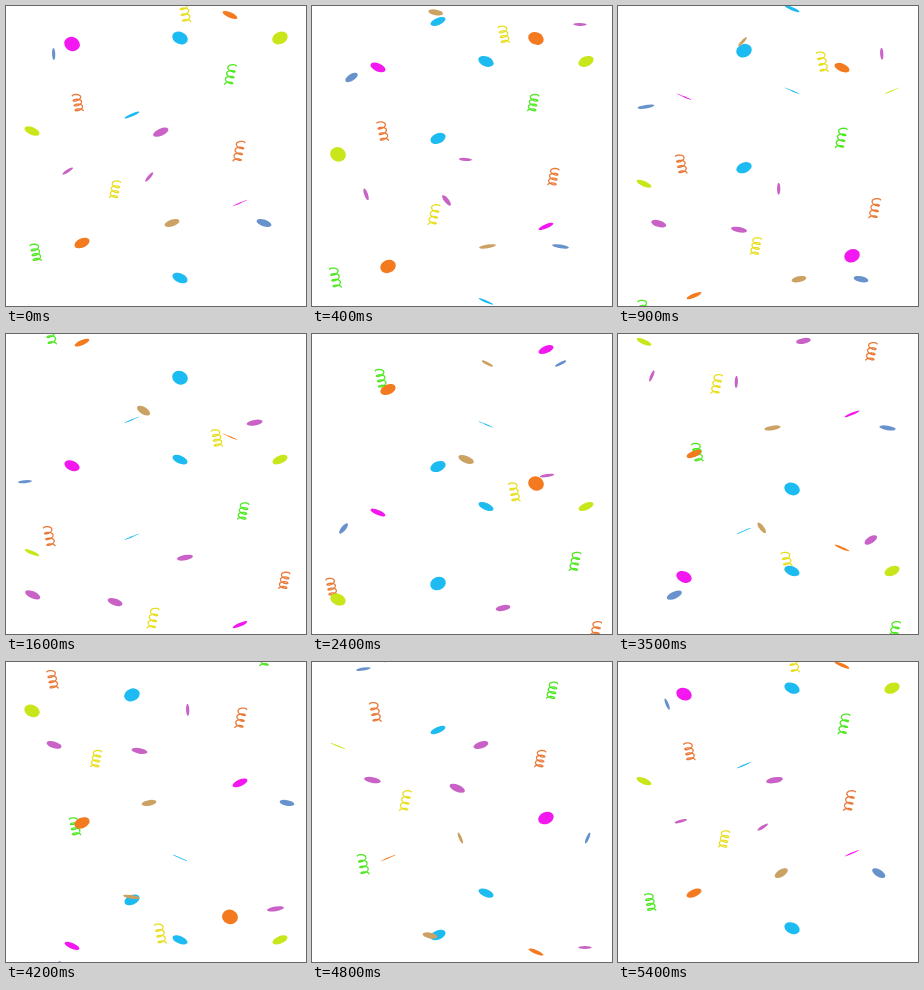
An HTML page with a canvas for the animation above (5500 ms loop, 300 by 300 pixels).

```html
<!DOCTYPE html>
<html lang="en">
<head>
<meta charset="utf-8">
<title>Confetti</title>
<style>
  html, body { margin: 0; width: 100%; height: 100%; overflow: hidden; background: #fff; }
  canvas { display: block; width: 300px; height: 300px; }
</style>
</head>
<body>
<canvas id="stage" width="300" height="300"></canvas>
<script>
const ctx = document.getElementById('stage').getContext('2d');
const STEPS = 55, STEP_MS = 100, FALL = 322, SPEED = FALL / STEPS;
const TAU = 2 * Math.PI;

const color = {
  cyan: '#1cbbf1', orange: '#f47a1f', lime: '#c9e61a', magenta: '#f318f0',
  purple: '#c962c6', slate: '#6892cc', tan: '#cba263',
  green: '#4fe822', yellow: '#e8df22', rust: '#ea7a38'
};

// Spinning discs: color, x, start y, tilt direction
const discs = [
  ['orange', 224, 9, 1], ['cyan', 174, 32, 1], ['cyan', 174, 272, 1], ['lime', 274, 32, -1],
  ['magenta', 66, 38, 1], ['cyan', 126, 109, -1], ['cyan', 126, -8, -1], ['lime', 26, 125, 1],
  ['magenta', 234, 197, -1], ['orange', 76, 237, -1]
];

// Fluttering flakes: color, x offset, start y, direction
const flakes = [
  ['slate', 0, 49, 1], ['slate', 300, 212, -1], ['tan', 124, 212, 1], ['tan', 175, -16, -1],
  ['purple', 134, 125, 1], ['purple', 83, 160, -1], ['purple', 166, 166, -1], ['purple', 216, -4, 1]
];

// Streamers: color, x offset, start step, direction
const streamers = [
  ['green', 0, 39, 1], ['yellow', 131, 1, 1], ['rust', -8, 16, 1],
  ['green', 301, 12, -1], ['rust', 308, 23, -1], ['yellow', 170, 29, -1]
];

const mod = (a, n) => ((a % n) + n) % n;
const wrap = (a, min, span) => mod(a - min, span) + min;
const bump = (x, width) => Math.exp(-((x / width) ** 2));
const wave = (x, period) => Math.cos(TAU * x / period);

function ease(x, from, to) {
  const p = Math.min(1, Math.max(0, (x - from) / (to - from)));
  return p * p * (3 - 2 * p);
}

function oval(fill, x, y, rx, ry, degrees) {
  ctx.fillStyle = fill;
  ctx.beginPath();
  ctx.ellipse(x, y, rx, ry, degrees * Math.PI / 180, 0, TAU);
  ctx.fill();
}

function drawDisc([name, x, start, dir], step) {
  const y = wrap(start + SPEED * step, -11, FALL);
  const spin = Math.abs(mod((y - 40) / (FALL / 3), 1) - 0.5) * 2;
  oval(color[name], x, y, 8, 0.5 + 6.8 * Math.max(0, 1.2 * spin - 0.2), 23 * dir);
}

function drawFlake([name, offset, start, dir], step) {
  const fall = wrap(start + SPEED * step, -20, FALL);
  const y = fall - 1 + 6 * ease(fall, 118, 135) + 3.5 * ease(fall, 242, 262);

  // Swings left, then a little further right
  const swing = wave(Math.min(y, 272) - 18, 254);
  const x = y < 145 ? 35.5 + 16.5 * swing : 38 + 19 * swing;

  // Tumbles through half a turn, then wobbles twice
  const turn = mod(y - 7, 134);
  const wobble = Math.abs(turn - 96) - 26;
  const angle = -9 + 180 * ease(turn, 0, 78) - 17 * bump(wobble, 7);
  oval(color[name], offset + dir * x, y,
    7.3 - 1.3 * wave(turn - 35, 134), 1.5 + 2.1 * bump(wobble, 17), dir * angle);
}

function drawStreamer([name, offset, start, dir], step) {
  const t = wrap(start + step, -4, STEPS);
  const side = wave(t - 17, STEPS);
  const x = 51.5 + 28.5 * side + 4 * (1 - side * side);
  const y = 1.5 + 6.3 * t - 8 * bump(t - 11, 7);
  const half = 9.5 + wave(t - 11, 11.2);
  const first = Math.PI, last = 8 * Math.PI;

  ctx.save();
  ctx.translate(offset + dir * x, y);
  ctx.scale(dir, 1);
  ctx.rotate(-0.2);
  ctx.beginPath();
  for (let a = first; a <= last; a += 0.2) {
    const along = (a - first) / (last - first) * 2 - 1;
    ctx.lineTo(4 * Math.cos(a), along * half + 1.9 * Math.sin(a));
  }
  ctx.strokeStyle = color[name];
  ctx.lineWidth = 1.3;
  ctx.lineJoin = ctx.lineCap = 'round';
  ctx.stroke();
  ctx.restore();
}

function tick(now) {
  const step = mod(Math.floor(now / STEP_MS), STEPS);
  ctx.fillStyle = '#fff';
  ctx.fillRect(0, 0, 300, 300);
  streamers.forEach(s => drawStreamer(s, step));
  discs.forEach(d => drawDisc(d, step));
  flakes.forEach(f => drawFlake(f, step));
  requestAnimationFrame(tick);
}
tick(0);
</script>
</body>
</html>
```
